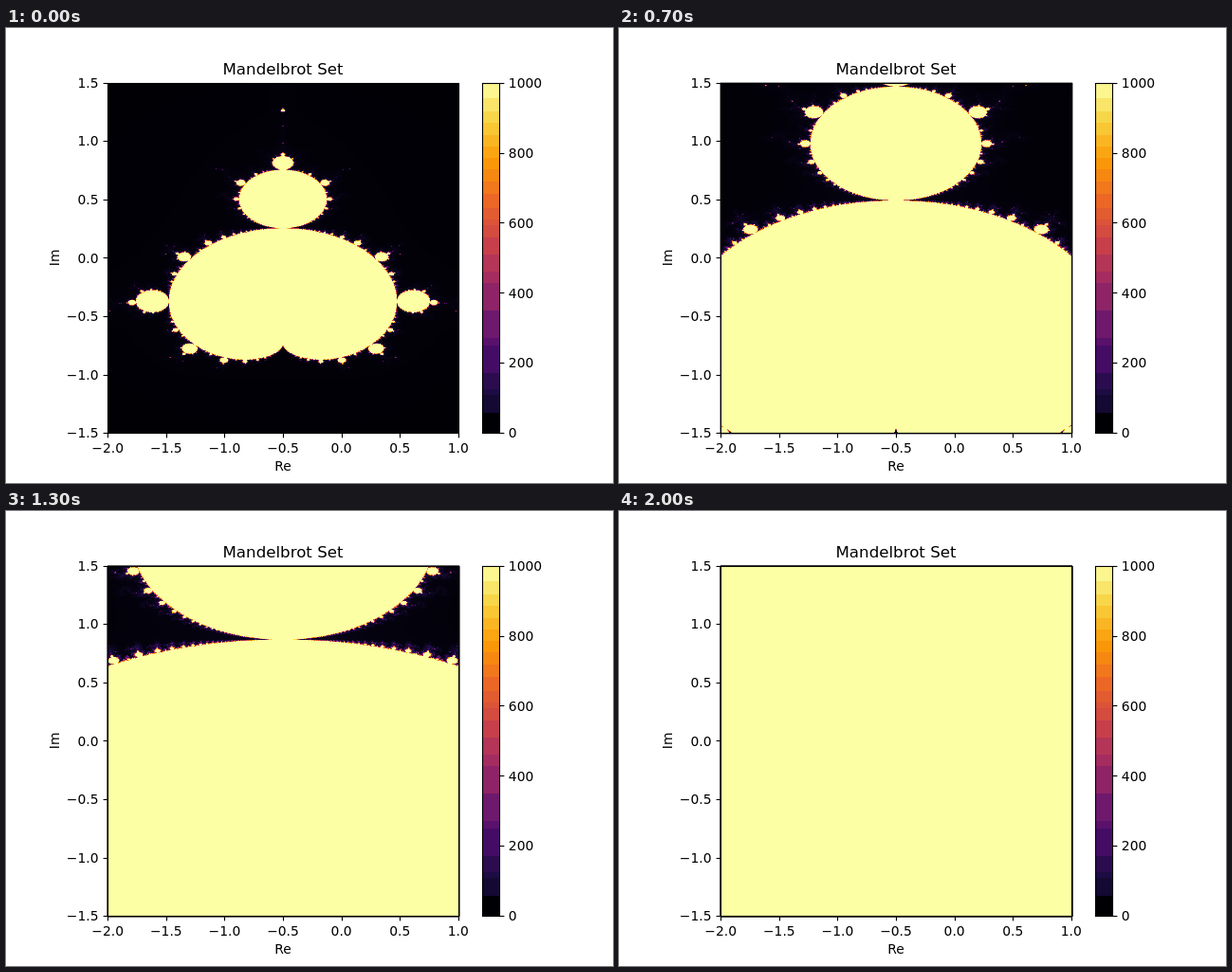
An HTML page with a canvas that plays this animation: 640x480 px, repeating every 10 s.

```html
<!DOCTYPE html>
<html lang="en">
<head>
<meta charset="utf-8">
<title>Mandelbrot Set</title>
<style>
  html, body { margin: 0; width: 100%; height: 100%; overflow: hidden; background: #fff; }
  canvas { display: block; }
</style>
</head>
<body>
<canvas id="stage" width="640" height="480"></canvas>
<script>
const ctx = document.getElementById("stage").getContext("2d");
const LEFT = 107.2, TOP = 57.6, SIZE = 369.6, BOTTOM = TOP + SIZE;
const X0 = 107, Y0 = 58, W = 370, H = 369;
const MAX = 1000, STEPS = 20, STEP_MS = 100, LOOP_MS = 10000;

// Inferno colour map, evenly spaced stops
const stops = [0x000004, 0x1b0c41, 0x4a0c6b, 0x781c6d, 0xa52c60,
               0xcf4446, 0xed6925, 0xfb9b06, 0xf7d13d, 0xfcffa4];

function inferno(v) {
  const p = v * (stops.length - 1), i = Math.min(stops.length - 2, Math.floor(p));
  return [16, 8, 0].map(s => {
    const a = stops[i] >> s & 255, b = stops[i + 1] >> s & 255;
    return Math.round(a + (b - a) * (p - i));
  });
}

const palette = Array.from({ length: MAX + 1 }, (_, i) => inferno(i / MAX));

function escapeTime(a, b) {
  const bb = b * b, d = a - 0.25, q = d * d + bb;
  if (q * (q + d) <= bb / 4 || (a + 1) * (a + 1) + bb <= 1 / 16) return MAX;
  let x = 0, y = 0, oldX = 0, oldY = 0, check = 8;
  for (let n = 0; n < MAX; n++) {
    const xx = x * x, yy = y * y;
    if (xx + yy > 4) return n;
    y = 2 * x * y + b;
    x = xx - yy + a;
    // A repeating orbit never escapes
    if (Math.abs(x - oldX) + Math.abs(y - oldY) < 1e-10) return MAX;
    if (n === check) {
      oldX = x;
      oldY = y;
      check *= 2;
    }
  }
  return MAX;
}

// The real axis runs downwards; the picture is mirrored left to right.
function render(zoom) {
  const img = ctx.createImageData(W, H);
  const sx = 184.8 * zoom, sy = 123.2 * zoom;
  for (let j = 0; j < H; j++) {
    const re = (Y0 + j + 0.25 - 242) / sy - 0.5;
    for (let i = 0; i < W / 2; i++) {
      const im = (i + 0.25) / sx;
      let sum = 0;
      for (let k = 0; k < 4; k++)
        sum += escapeTime(re + (k >> 1) * 0.5 / sy, im + (k & 1) * 0.5 / sx);
      const [r, g, b] = palette[Math.round(sum / 4)];
      for (const col of [W / 2 + i, W / 2 - 1 - i]) {
        const o = (j * W + col) * 4;
        img.data[o] = r;
        img.data[o + 1] = g;
        img.data[o + 2] = b;
        img.data[o + 3] = 255;
      }
    }
  }
  return img;
}

const snap = v => Math.floor(v + 0.5) + 0.5;

function line(x1, y1, x2, y2) {
  ctx.beginPath();
  ctx.moveTo(x1, y1);
  ctx.lineTo(x2, y2);
  ctx.stroke();
}

function text(s, x, y, align = "center", size = 13.89) {
  ctx.font = `${size}px "DejaVu Sans", sans-serif`;
  ctx.textAlign = align;
  ctx.fillText(s, x, y);
}

function frameBox(x1, x2) {
  ctx.strokeRect(snap(x1), snap(TOP), snap(x2) - snap(x1), snap(BOTTOM) - snap(TOP));
}

const label = v => v.toFixed(1).replace("-", "\u2212");

function drawAxes() {
  ctx.fillStyle = ctx.strokeStyle = "#000";
  ctx.lineWidth = 1.11;
  for (let k = 0; k <= 6; k++) {
    const x = LEFT + k * SIZE / 6, y = BOTTOM - k * SIZE / 6;
    line(snap(x), 427.5, snap(x), 432.4);
    line(102.6, snap(y), 107.5, snap(y));
    text(label(-2 + k / 2), x, 448);
    text(label(-1.5 + k / 2), 97.5, y + 5.2, "right");
  }
  text("Mandelbrot Set", 292, 49.2, "center", 16.67);
  text("Re", 292, 467);
  ctx.save();
  ctx.translate(56, 242.4);
  ctx.rotate(-Math.PI / 2);
  text("Im", 0, 0);
  ctx.restore();
}

function drawColorbar() {
  const edges = [58, 74, 88, 100, 113, 125, 137, 149, 162, 175, 190, 202, 208,
                 221, 239, 257, 269, 298, 327, 335, 364, 381, 387, 406, 428];
  for (let i = 0; i < edges.length - 1; i++) {
    const a = edges[i], b = edges[i + 1];
    const v = b > 427 ? 0 : (BOTTOM - (a + b) / 2) / SIZE;
    ctx.fillStyle = `rgb(${inferno(v)})`;
    ctx.fillRect(502, a, 18, b - a);
  }
  ctx.fillStyle = "#000";
  for (let k = 0; k <= 5; k++) {
    const y = BOTTOM - k * SIZE / 5;
    line(520.5, snap(y), 525.4, snap(y));
    text(String(k * 200), 529.8, y + 5.2, "left");
  }
  frameBox(501.6, 520.08);
}

const views = Array.from({ length: STEPS + 1 }, (_, n) => render(1.1 ** n));
let shown = -1;

function show(n) {
  if (n === shown) return;
  shown = n;
  ctx.putImageData(views[n], X0, Y0);
  frameBox(LEFT, LEFT + SIZE);
}

ctx.fillStyle = "#fff";
ctx.fillRect(0, 0, 640, 480);
drawAxes();
drawColorbar();
show(0);

const start = performance.now();
function tick() {
  const t = (performance.now() - start) % LOOP_MS;
  show(Math.min(STEPS, Math.floor(t / STEP_MS)));
  requestAnimationFrame(tick);
}
requestAnimationFrame(tick);
</script>
</body>
</html>
```
